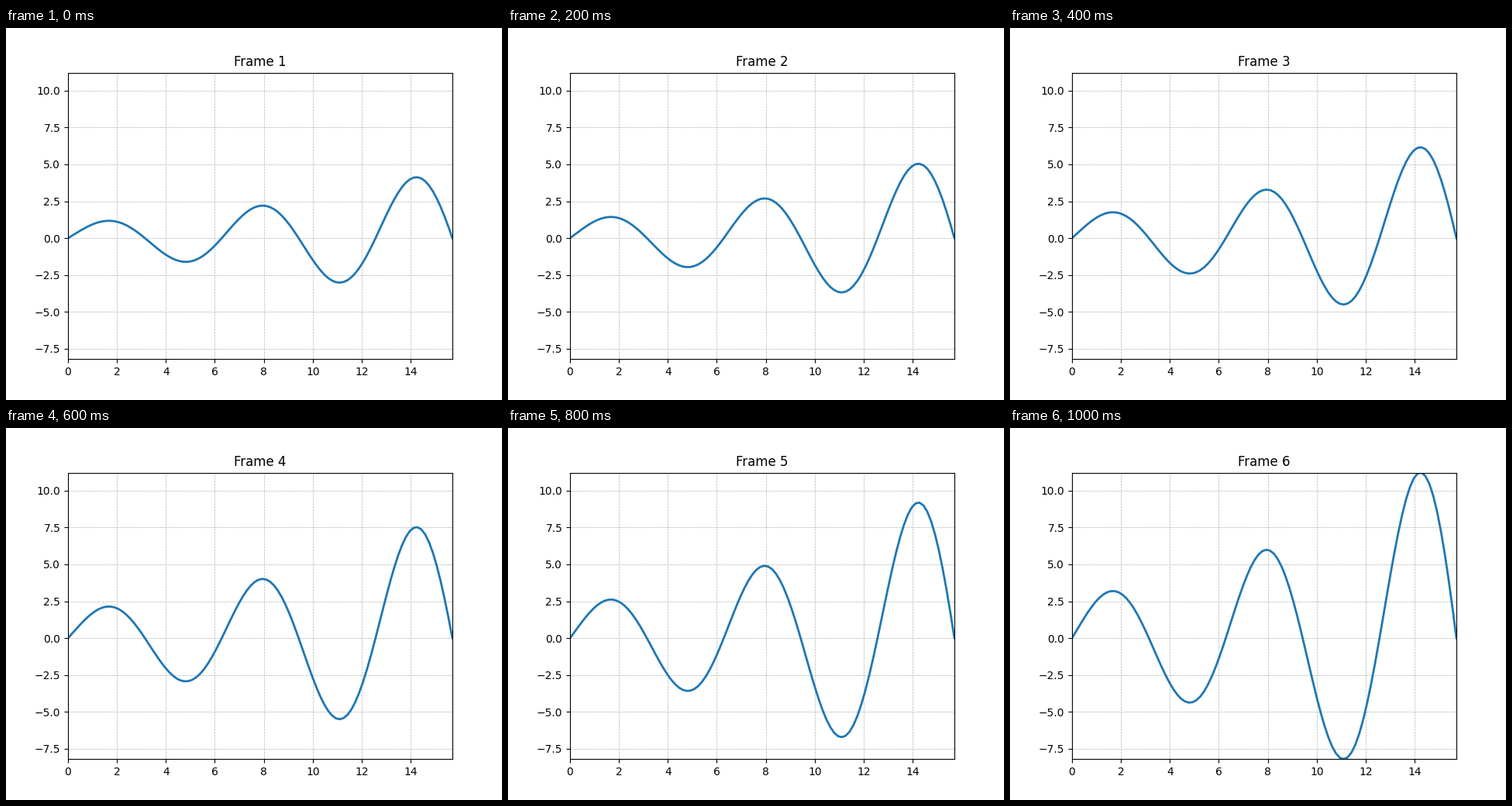
Animation, 640 px wide and 480 px high, one loop 1.2 s. Source, as a matplotlib script:

```python
import matplotlib.pyplot as plt
import numpy as np
from matplotlib.animation import FuncAnimation

FRAMES = 6
INTERVAL = 200  # ms

x = np.linspace(0, 5 * np.pi, 100)


def wave(step):
    """Sine whose envelope grows along x and with every step."""
    return np.exp(0.1 * x + 0.2 * step) * np.sin(x)


fig, ax = plt.subplots(figsize=(6.4, 4.8), dpi=100)
line, = ax.plot(x, wave(0), lw=2)
title = ax.set_title("Frame 1")

tallest = wave(FRAMES - 1)
ax.set_xlim(x[0], x[-1])
ax.set_ylim(tallest.min(), tallest.max())
ax.grid(True, linestyle="--", linewidth=0.5)


def update(step):
    line.set_ydata(wave(step))
    title.set_text(f"Frame {step + 1}")
    return line, title


anim = FuncAnimation(fig, update, frames=FRAMES, interval=INTERVAL,
                     repeat=True, repeat_delay=0, blit=False)
plt.show()
```
